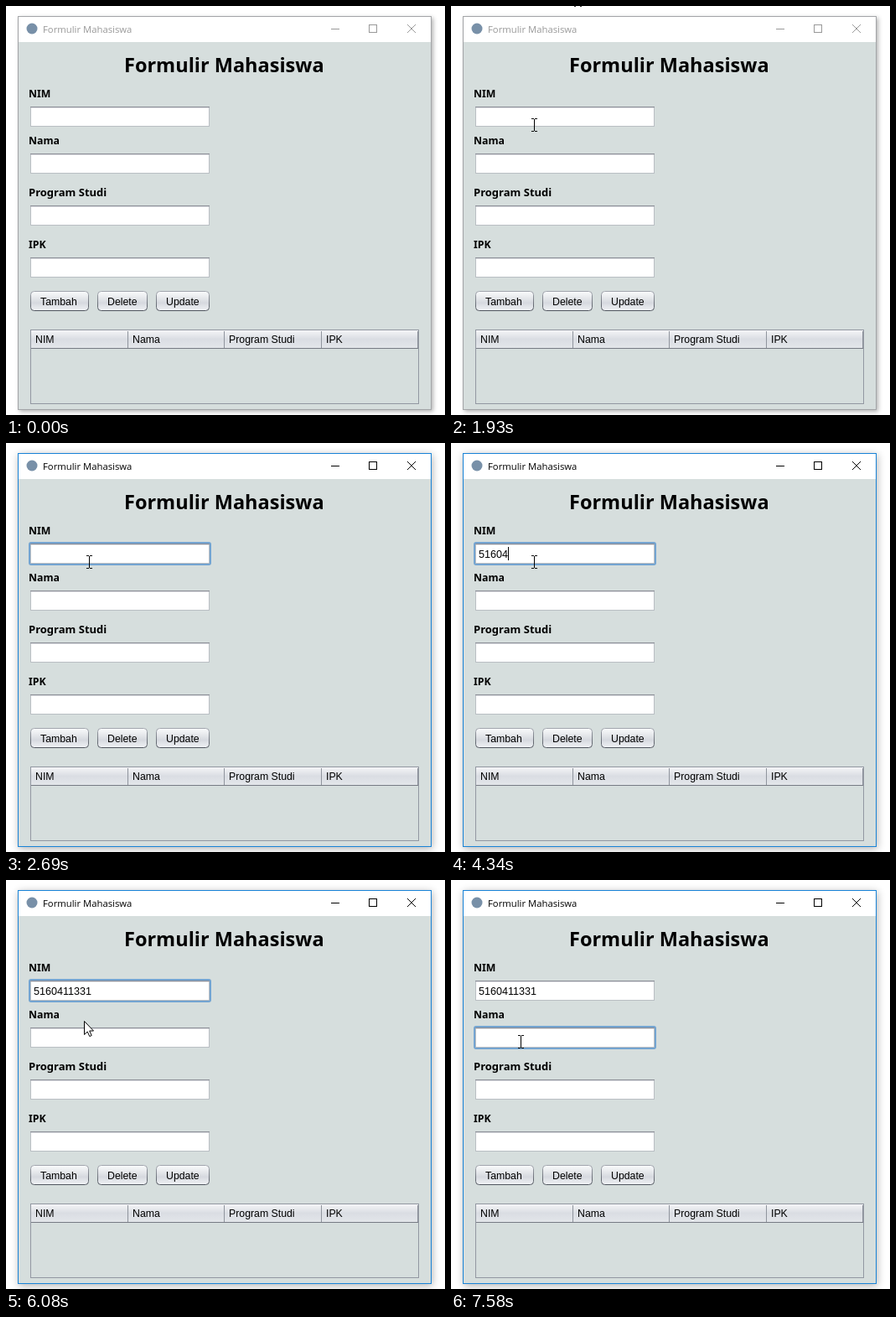
Animation of 524 by 488 pixels, one loop 8 s. Source, as an HTML page:

```html
<!DOCTYPE html>
<html lang="id">
<head>
<meta charset="utf-8">
<title>Formulir Mahasiswa</title>
<style>
html, body { margin: 0; width: 524px; height: 488px; overflow: hidden; background: #fff; }
#win { position: absolute; left: 14px; top: 12px; width: 492px; height: 468px;
  border: 1px solid #a3a5a8; background: #fff; box-shadow: 2px 2px 5px rgba(0,0,0,.3); }
#win.active { border-color: #1883d7; box-shadow: 1px 2px 9px rgba(0,0,0,.3); }
svg { position: absolute; left: 0; top: 0; }
text { font: 12.3px "Liberation Sans", Arial, sans-serif; }
.bold { font: bold 12.3px "Noto Sans", "Open Sans", sans-serif; }
#bar { color: #999; }
#bar.active { color: #000; }
#bar text { font: 11.3px "Open Sans", "Noto Sans", sans-serif; fill: currentColor; }
#bar path { fill: none; stroke: currentColor; }
.crisp { shape-rendering: crispEdges; }
</style>
</head>
<body>
<div id="win"></div>
<svg width="524" height="488" viewBox="0 0 524 488">
  <defs>
    <linearGradient id="face" x2="0" y2="1">
      <stop offset="0" stop-color="#fafbfc"/>
      <stop offset=".45" stop-color="#dfe2e6"/>
      <stop offset=".6" stop-color="#d6d9df"/>
      <stop offset="1" stop-color="#f0f2f5"/>
    </linearGradient>
    <linearGradient id="edge" x2="0" y2="1">
      <stop offset="0" stop-color="#a2a6ae"/>
      <stop offset="1" stop-color="#50555e"/>
    </linearGradient>
    <linearGradient id="head" x2="0" y2="1">
      <stop offset="0" stop-color="#f4f5f7"/>
      <stop offset=".5" stop-color="#dadde3"/>
      <stop offset="1" stop-color="#e3e6ea"/>
    </linearGradient>
  </defs>
  <path id="behind" class="crisp" d="M147 0h2v1h-2zM154 0h2v1h-2z" fill="#333"/>
  <rect x="15" y="43" width="492" height="438" fill="#d6dedd"/>
  <circle cx="31" cy="27" r="6.5" fill="#7890a8"/>
  <g id="bar">
    <text x="44" y="32">Formulir Mahasiswa</text>
    <path class="crisp" d="M388 27.5h10M433.5 22.5h9v9h-9z"/>
    <path d="M479 22l10 10M489 22l-10 10"/>
  </g>
  <text class="bold" x="141" y="79" style="font-size:23.5px">Formulir Mahasiswa</text>
  <g id="form"></g>
  <rect id="ring" x="28" width="216" height="26" rx="2" fill="none" stroke="#73a4d1" stroke-width="2"/>
  <text id="typed" x="33" y="137" style="font-size:12.59px"></text>
  <rect id="caret" class="crisp" width="1" height="16"/>
  <path id="arrow" d="M.5 .5V16.5L4.2 13L6.8 18.6L9.2 17.5L6.7 12H11.5Z" fill="#fff" stroke="#000"/>
  <path id="beam" class="crisp" d="M-3 -7.5h3M1 -7.5h3M-3 7.5h3M1 7.5h3M.5 -7V7" stroke="#000"/>
</svg>
<script>
const $ = id => document.getElementById(id);
const fieldTops = [120, 176, 238, 300];
const columns = [29, 145, 260, 376, 491];
const names = ['NIM', 'Nama', 'Program Studi', 'IPK'];

const label = (s, i) => `
  <text class="bold" x="27" y="${fieldTops[i] - 11}"${i == 2 ? ' style="font-size:13px"' : ''}>${s}</text>`;
const field = y => `<g class="crisp">
  <rect x="29.5" y="${y + .5}" width="213" height="23" fill="#fff" stroke="#b9bec3"/>
  <path d="M29 ${y + .5}h214" stroke="#8b8d96"/>
  <path d="M30 ${y + 1.5}h212" stroke="#dcdee2"/></g>`;
const button = ([s, x, w, tx]) => `
  <rect x="${x + .5}" y="340.5" width="${w - 1}" height="23" rx="4" fill="url(#face)" stroke="url(#edge)"/>
  <text x="${tx}" y="357">${s}</text>`;
const column = (s, i) => `
  <path class="crisp" d="M${columns[i + 1] + .5} 388v20" stroke="#8f949d"/>
  <text x="${columns[i] + 6}" y="402">${s}</text>`;

$('form').innerHTML = names.map(label).join('') + fieldTops.map(field).join('') +
  [['Tambah', 29, 70, 41], ['Delete', 109, 60, 121], ['Update', 179, 64, 191]].map(button).join('') +
  `<g class="crisp"><rect x="30" y="387" width="462" height="21" fill="url(#head)"/>
   <path d="M30 408.5h462" stroke="#767a83"/>
   <rect x="29.5" y="386.5" width="463" height="88" fill="none" stroke="#9297a1"/></g>` +
  names.map(column).join('');

const keyTimes = [2950, 3180, 3640, 3940, 4340, 4400, 4560, 5180, 5380, 5540];
const caretOn = [[2190, 2690], [2950, 4920], [5180, 5870], [6290, 6850], [7050, 7580]];
// pointer path: time, x, y
const path = [[760, 504, 54], [830, 485, 36], [980, 474, 25], [1365, 474, 25], [1540, 127, 51],
  [1600, 125, 55], [1780, 106, 108], [1930, 99, 142], [5835, 99, 142], [6040, 95, 163],
  [6290, 83, 193], [8000, 83, 193]];

function pointer(t) {
  const i = path.findIndex(p => p[0] > t);
  const [t0, x0, y0] = path[i - 1], [t1, x1, y1] = path[i];
  const k = (t - t0) / (t1 - t0);
  return [Math.round(x0 + (x1 - x0) * k), Math.round(y0 + (y1 - y0) * k)];
}
const show = (id, on) => $(id).style.display = on ? '' : 'none';

function draw(t) {
  const active = t >= 2030, second = t >= 7050;
  $('win').classList.toggle('active', active);
  $('bar').classList.toggle('active', active);
  show('behind', t >= 1410 && !active);

  show('ring', t >= 2190);
  $('ring').setAttribute('y', second ? 175 : 119);
  const count = keyTimes.filter(k => t >= k).length;
  $('typed').textContent = '5160411331'.slice(0, count);
  show('caret', caretOn.some(([a, b]) => t >= a && t < b));
  $('caret').setAttribute('x', second ? 33 : 33 + 7 * count);
  $('caret').setAttribute('y', second ? 180 : 124);

  const visible = t >= 760;
  // moves arrive in short steps; the position holds from 1540 to 1600
  const moment = t >= 1540 && t < 1600 ? 1540 : t >= 1930 ? t : Math.max(760, t - (t - 760) % 10);
  const [x, y] = visible ? pointer(moment) : [0, 0];
  const overField = x >= 29 && x < 243 && fieldTops.some(f => y >= f && y < f + 24);
  show('arrow', visible && !overField);
  show('beam', visible && overField);
  for (const id of ['arrow', 'beam']) $(id).setAttribute('transform', `translate(${x} ${y})`);
}

const start = performance.now();
function tick() {
  draw((performance.now() - start) % 8000);
  requestAnimationFrame(tick);
}
tick();
</script>
</body>
</html>
```
